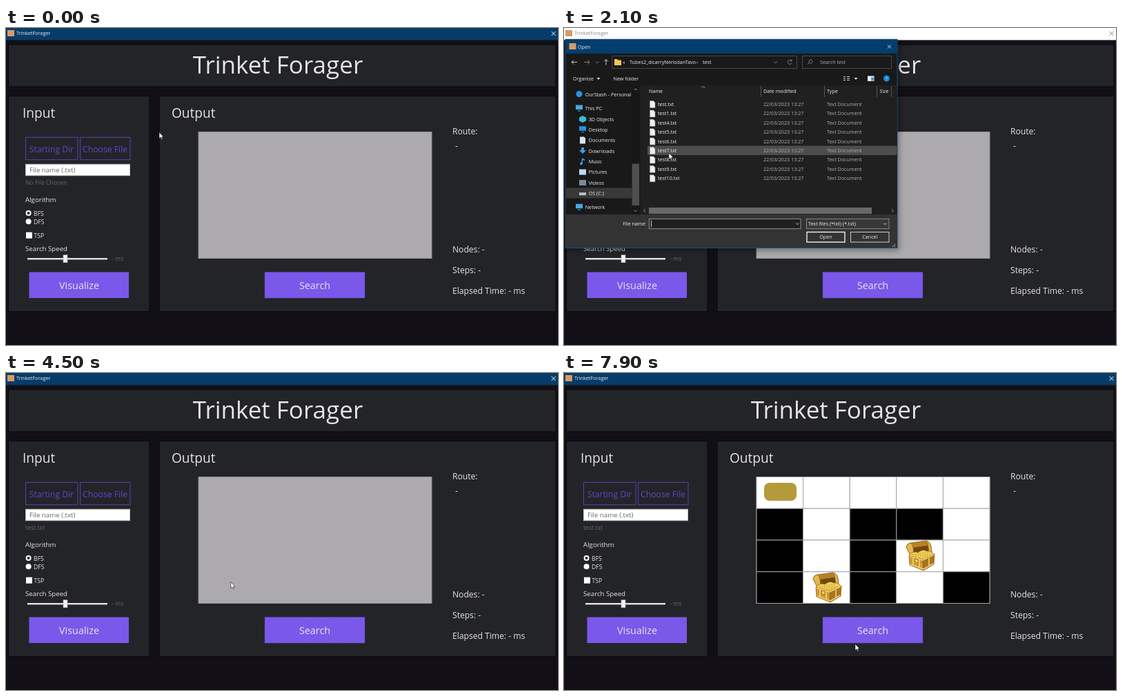
An HTML page for the animation above (8 s loop, 800x459 px).

```html
<!DOCTYPE html>
<html lang="en">
<head>
<meta charset="utf-8">
<title>TrinketForager</title>
<style>
  html, body { margin: 0; width: 100%; height: 100%; overflow: hidden; background: #121016; }
  svg { display: block; width: 800px; height: 459px; }
  text { font-family: "Open Sans", "Noto Sans", sans-serif; fill: #e6e4e8; white-space: pre; }
  .mid { text-anchor: middle; }
  .panel { fill: #232428; stroke: #08070a; }
  .h2 { font-size: 19.1px; }
  .btn { font-size: 14.4px; }
  .alt { font-size: 12.2px; fill: #6446cc; }
  .out { font-size: 12.1px; }
  .lab { font-size: 9.7px; }
  .sm { font-size: 8.7px; }
  .dim { fill: #66666a; }
  .line { fill: none; stroke: #ccc; stroke-width: 1; }
  .box { fill: none; stroke: #555; stroke-width: .8; }
  #dialog text { font-size: 7.2px; fill: #eee; }
  #dialog .grey { fill: #b0b0b0; }
  #dialog { filter: drop-shadow(2px 3px 4px rgba(0, 0, 0, .35)); }
  #blank, #dialog { transform-origin: 241px 167px; }
</style>
</head>
<body>
<svg viewBox="0 0 800 459">
  <defs>
    <g id="chest" stroke="#85571a" stroke-width=".7" stroke-linejoin="round">
      <path fill="#b98225" d="M1 9Q2 4 7 3L29 0Q36 1 37 9L38 17L7 21Z"/>
      <path fill="#e3b850" d="M1 9Q2 4 7 3Q11 5 11 11L12 20L7 21ZM29 0Q36 1 37 9L38 17L34 18L33 9Q33 3 29 0Z"/>
      <path fill="#6f4717" d="M12 10L32 7L34 18L12 20Z"/>
      <path fill="#f2cf55" d="M5 21Q11 14 18 17Q25 11 31 15Q38 14 41 20L25 28Z"/>
      <path fill="#d19a32" d="M5 21L25 27L26 43L6 35Z"/>
      <path fill="#ab7320" d="M25 27L42 19L41 34L26 43Z"/>
      <path fill="none" stroke="#f0cf6c" stroke-width="1.7" d="M6 22L25 28L41 20M7 34L26 41L40 33M11 24V36M20 27V39M34 25V36"/>
      <path fill="none" stroke="#b3862a" stroke-width="1" stroke-dasharray="1.5 2" d="M10 20L34 17M14 22L36 20M20 25L32 22"/>
      <path fill="#f6dc82" d="M14 26L18 27V32L14 31Z"/>
    </g>
    <path id="page" d="M0 0H5L7.5 2.5V10H0Z" fill="#eee" stroke="#999" stroke-width=".5"/>
  </defs>

  <rect width="800" height="459" fill="#121016"/>
  <rect id="bar" width="800" height="17.5"/>
  <rect x="2" y="3" width="10" height="9" fill="#d99a63"/>
  <text id="app" x="15" y="10.4" font-size="7.3">TrinketForager</text>
  <path id="close" d="M790.5 5l6 6m0-6l-6 6" fill="none"/>

  <rect class="panel" x="3.5" y="24" width="793.5" height="61"/>
  <rect class="panel" x="3.5" y="98.5" width="204.5" height="312"/>
  <rect class="panel" x="222" y="98.5" width="575" height="312"/>
  <text class="mid" x="394" y="66" font-size="35">Trinket Forager</text>
  <text class="h2" x="24" y="130">Input</text>
  <text class="h2" x="240" y="130">Output</text>

  <rect x="28.5" y="158.3" width="75.5" height="32.4" fill="none" stroke="#5a40b8"/>
  <text class="alt mid" x="66" y="179.7">Starting Dir</text>
  <rect id="choose" x="107.7" y="158.3" width="72.3" height="32.4" stroke="#5a40b8"/>
  <text class="alt mid" x="143.6" y="179.7">Choose File</text>
  <rect x="28.5" y="197.3" width="151" height="16.4" fill="#fff" stroke="#b5c4bb"/>
  <text class="lab" x="34" y="209" style="fill:#666">File name (.txt)</text>
  <text id="chosen" class="sm dim" x="28" y="227"></text>
  <text class="lab" x="28" y="252.3">Algorithm</text>
  <circle cx="32.6" cy="268" r="4" fill="#fff"/><circle cx="32.6" cy="268" r="2" fill="#222"/>
  <circle cx="32.6" cy="280.2" r="4" fill="#fff"/>
  <text class="sm" x="40" y="271.7">BFS</text>
  <text class="sm" x="40" y="284">DFS</text>
  <rect x="29" y="295.7" width="9" height="9" fill="#fff"/>
  <text class="sm" x="40.5" y="303.7">TSP</text>
  <text class="lab" x="28" y="322.6">Search Speed</text>
  <rect x="31" y="333" width="116" height="2.4" fill="#e2e2e4"/>
  <rect x="83" y="328.7" width="6" height="11" fill="#f2f2f2" stroke="#aaa" stroke-width=".6"/>
  <text class="sm dim" x="153" y="337.2">- ms</text>
  <rect id="visual" x="33.5" y="353.5" width="144.5" height="37.5"/>
  <text class="btn mid" x="106" y="378">Visualize</text>

  <rect x="279" y="150.5" width="338" height="183" fill="#acaaac" stroke="#8e8d90"/>
  <g id="map"></g>
  <rect x="375" y="353.5" width="145" height="37.5" fill="#7a58ea" stroke="#5a40b8" stroke-dasharray="1.5 1.5"/>
  <text class="btn mid" x="447.5" y="378">Search</text>
  <text class="out" x="647" y="154">Route:</text>
  <text class="out" x="651" y="174.5">-</text>
  <text class="out" x="647" y="324.6">Nodes: -</text>
  <text class="out" x="647" y="354.7">Steps: -</text>
  <text class="out" x="647" y="385">Elapsed Time: - ms</text>

  <g id="blank">
    <rect x="8" y="21" width="465" height="292" fill="#333"/>
    <rect x="8" y="21" width="465" height="19" fill="#0a2f4d"/>
    <rect x="13" y="26" width="9" height="8" fill="#d99a63"/>
    <text x="25" y="33" font-size="7">Open</text>
    <path class="line" d="M460 27l5 5m0-5l-5 5"/>
    <rect x="8" y="40" width="465" height="225" fill="#fff"/>
    <rect x="8" y="85" width="104" height="180" fill="#191919"/>
    <rect x="101" y="85" width="11" height="180" fill="#111"/>
    <rect x="124" y="255" width="338" height="10" fill="#222"/>
    <rect x="124" y="255" width="313" height="10" fill="#4d4d4d"/>
    <path fill="#fff" d="M124 271.500h215v14.500h-215ZM346 271.500h117v14.500h-117ZM346 289h54.500v16h-54.500ZM408 289h55v16h-55ZM463 302h10v11h-10Z"/>
    <rect x="88" y="273.500" width="33.500" height="9.500" fill="#ccc"/>
  </g>

  <g id="dialog">
    <rect x="2" y="16.500" width="481" height="302" fill="#191919" stroke="#17527f"/>
    <rect x="2.500" y="17" width="480" height="20" fill="#033e6e"/>
    <rect x="7.500" y="22" width="10" height="9" fill="#d99a63"/>
    <text x="20" y="29.600">Open</text>
    <path class="line" d="M469 24.500l5 5m0-5l-5 5"/>
    <path class="line" d="M19 49.500h-8m3-3l-3 3l3 3M61 53.500v-8m-3 3l3-3l3 3"/>
    <path class="line" style="stroke:#888" d="M29 49.500h8m-3-3l3 3l-3 3M46 48.500l2.300 2.300l2.300-2.300M304 48.500l2.500 2.500l2.500-2.500M329.800 47.500a3 3 0 1 0 .4 3m-.2-5v2.300h-2.300"/>
    <rect class="box" x="70" y="40.500" width="267.500" height="18"/>
    <path fill="#f3c653" d="M73 45h4l1 1.500h5v7.500h-10Z"/>
    <text x="85" y="52">«</text>
    <text x="95" y="52">Tubes2_dicarryNerisdanTavo</text>
    <text x="192" y="52">›</text>
    <text x="201" y="52">test</text>
    <rect class="box" x="345.500" y="40.500" width="129" height="18"/>
    <path class="line" style="stroke:#888" d="M353 53l2.500-3a2.500 2.500 0 1 1 1 .8"/>
    <text class="grey" x="371" y="52">Search test</text>
    <text x="13" y="75.600">Organize</text>
    <text x="71.500" y="75.600">New folder</text>
    <path fill="#ddd" d="M47.500 72h5l-2.500 3ZM420.500 72h5l-2.500 3Z"/>
    <path class="line" d="M405 70.500h3m2 0h4M405 73h3m2 0h4M405 75.500h3m2 0h4"/>
    <rect x="440" y="69.500" width="9.500" height="7.500" fill="#eee"/><rect x="445" y="71.500" width="4" height="5" fill="#3c9be0"/>
    <circle cx="467.500" cy="73" r="4.600" fill="#1487dd"/>
    <text class="mid" x="467.500" y="75.700">?</text>

    <rect x="110.500" y="83" width="372" height="187" fill="#202020"/>
    <rect x="3" y="231.500" width="95.500" height="15" fill="#393939"/>
    <g id="side"></g>
    <rect x="98.500" y="83" width="10.500" height="187" fill="#171717"/>
    <rect x="98.500" y="196.500" width="10.500" height="60.500" fill="#4f4f4f"/>
    <path class="line" style="stroke:#999" d="M101.500 90l2.300-2.300l2.300 2.300M101.500 263.500l2.300 2.300l2.300-2.300M199.500 86.500l2.500-2l2.500 2M118 262.300l-2.300 2.200l2.300 2.200M475 262.300l2.300 2.200l-2.300 2.200"/>
    <path class="line" style="stroke:#555" d="M285.500 84v16M377.500 84v16M453.500 84v16M474.500 84v16"/>
    <text x="123" y="94">Name</text>
    <text x="289" y="94">Date modified</text>
    <text x="381" y="94">Type</text>
    <text x="457.500" y="94">Size</text>
    <rect id="picked" x="121.500" y="103.800" width="360.500" height="13" fill="#777" stroke="#999" stroke-width=".7"/>
    <rect id="hover" x="121" width="361.500" height="13.400" fill="#4d4d4d"/>
    <g id="files"></g>
    <rect x="123" y="260" width="323" height="9" fill="#686868"/>

    <rect x="2.500" y="270" width="480" height="48" fill="#333"/>
    <text x="119.500" y="285.800" text-anchor="end">File name:</text>
    <rect id="field" x="123.500" y="276.300" width="219.500" height="14.400" stroke="#aaa" stroke-width=".8"/>
    <text id="fname" x="125.500" y="286"></text>
    <path id="caret" class="line" d="M126.500 278.500v10"/>
    <rect x="351.500" y="276.300" width="119.500" height="14.400" fill="#383838" stroke="#999" stroke-width=".8"/>
    <text x="354" y="286">Text files (*txt) (*.txt)</text>
    <path class="line" d="M336 282.500l2.200 2.200l2.200-2.200M463 282.500l2.200 2.200l2.200-2.200"/>
    <rect x="352" y="295.500" width="55" height="14.500" fill="#333" stroke="#eee" stroke-width="1.400"/>
    <rect x="415.500" y="295.500" width="55.500" height="14.500" fill="#333" stroke="#ccc"/>
    <text class="mid" x="379.500" y="305.300">Open</text>
    <text class="mid" x="443.300" y="305.300">Cancel</text>
    <path d="M476 316h5m-2.500-2.500h2.500" stroke="#aaa" stroke-width="1.300" stroke-dasharray="1.300 1.200"/>
  </g>

  <path id="cursor" d="M0 0V9L2.100 7.200L3.500 10.300L4.900 9.700L3.600 6.700H6.400Z" fill="#fff" stroke="#111" stroke-width=".6"/>
</svg>
<script>
const $ = id => document.getElementById(id);
const LOOP = 8000, STEP = 100, ROW0 = 103.6, ROW = 13.4;

// Map: 1 = wall
const W = 67.6, H = 45.75;
$("map").innerHTML = ["00000", "10110", "10100", "10101"].map((row, r) => [...row].map((c, i) =>
  `<rect x="${279 + i * W}" y="${150.5 + r * H}" width="${W}" height="${H}" fill="${+c ? "#000" : "#fff"}" stroke="#a5a4a6"/>`
).join("")).join("") +
  `<rect x="290" y="159" width="47" height="26" rx="8" fill="#b59a3c"/>
   <use href="#chest" x="360" y="289"/><use href="#chest" x="495" y="243"/>`;

// Sidebar: name, centre y, indent, icon colour, icon path
const screen = "M0 0h10v6.500h-10ZM3 8h4v1h-4Z", sheet = "M1 0h6l2 2v8h-8Z";
const arrow = "M3 0h4v4h3l-5 5l-5-5h3Z", note = "M4 0l4 2v2l-3-1v5a2 2 0 1 1-1.500-2Z";
$("side").innerHTML = [
  ["OurStash - Personal", 96, 17, "#2a91e0", "M5 0a4.500 4.500 0 1 1-.1 0Z"],
  ["This PC", 116.5, 17, "#45a9e6", screen],
  ["3D Objects", 132, 22, "#42b6d6", "M5 0l5 2.500v5l-5 2.500l-5-2.500v-5Z"],
  ["Desktop", 147.3, 22, "#2a91e0", screen],
  ["Documents", 162.6, 22, "#d8e4ec", sheet],
  ["Downloads", 178, 22, "#3b9de8", arrow],
  ["Music", 193.3, 22, "#3b9de8", note],
  ["Pictures", 208.6, 22, "#b9dcec", "M0 1h10v8h-10Z"],
  ["Videos", 224, 22, "#7e8aa0", "M0 1h10v8h-10Z"],
  ["OS (C:)", 239.2, 22, "#b8c4cc", "M0 4h10v4h-10Z"],
  ["Network", 259.7, 17, "#45a9e6", screen],
].map(([name, y, x, fill, d]) =>
  `<path transform="translate(${x} ${y - 5})" fill="${fill}" d="${d}"/><text x="${x + 13.7}" y="${y + 2.6}">${name}</text>`
).join("");

const files = ["", 1, 4, 5, 6, 7, 8, 9, 10];
$("files").innerHTML = files.map((n, i) => {
  const y = 113 + i * ROW;
  return `<use href="#page" x="124.500" y="${y - 7.5}"/><text x="136" y="${y}">test${n}.txt</text>
    <text class="grey" x="289" y="${y}">22/03/2023 13:27</text><text class="grey" x="381" y="${y}">Text Document</text>`;
}).join("");

// Pointer stops: time, x, y
const stops = [
  [0, 222, 151], [600, 162, 177], [1000, 158, 182], [1500, 157, 217.5], [1700, 157, 217.5],
  [2100, 152, 181], [2700, 150, 109], [3100, 150, 109], [3900, 363, 301], [4300, 363, 301],
  [5200, 68, 313.5], [5500, 68, 316], [6100, 84, 371], [6300, 84, 371], [6500, 79, 374.5],
  [6900, 79, 374.5], [7300, 230, 424], [7700, 400, 410], [7900, 422, 392.5], [LOOP, 422, 392.5],
];

function pointer(t) {
  const i = stops.findIndex(s => s[0] > t);
  const [t0, x0, y0] = stops[i - 1], [t1, x1, y1] = stops[i];
  const u = (t - t0) / (t1 - t0), e = u * u * (3 - 2 * u);
  return [x0 + (x1 - x0) * e, y0 + (y1 - y0) * e];
}

const inside = (x, y, l, t, r, b) => x >= l && x <= r && y >= t && y <= b;
const show = (id, on) => $(id).setAttribute("display", on ? "inline" : "none");
const paint = (id, fill) => $(id).setAttribute("fill", fill);
function pose(id, opacity, scale) {
  $(id).style.opacity = opacity;
  $(id).style.transform = scale === 1 ? "none" : `scale(${scale})`;
}

function draw(t) {
  const [x, y] = pointer(t);
  const modal = t >= 900 && t < 4300, picked = t >= 2900, closing = t >= 4300;
  $("cursor").setAttribute("transform", `translate(${x} ${y})`);

  paint("bar", modal ? "#fff" : "#063c69");
  $("app").style.fill = modal ? "#888" : "#e6eef5";
  $("close").setAttribute("stroke", modal ? "#888" : "#fff");
  paint("choose", modal || inside(x, y, 108, 158, 180, 191) ? "#bee6fd" : "#232428");
  const over = inside(x, y, 33, 353, 178, 391);
  paint("visual", !over ? "#7a58ea" : t >= 6400 ? "#c4e5f6" : "#bee6fd");
  $("chosen").textContent = closing ? "test.txt" : "No File Chosen";
  show("map", t >= 6900);

  show("blank", t >= 1600 && t < 1900);
  pose("blank", t < 1700 ? .12 : t < 1800 ? .42 : .9, t < 1700 ? .95 : t < 1800 ? 1 : 1.03);

  show("dialog", t >= 1900 && t < 4400);
  pose("dialog", closing ? .42 : 1, closing ? .965 : 1);
  const row = Math.floor((y - ROW0) / ROW);
  show("hover", x > 121 && x < 482 && row >= (picked ? 1 : 0) && row < files.length);
  $("hover").setAttribute("y", ROW0 + row * ROW);
  show("picked", picked);
  $("fname").textContent = picked ? "test.txt" : "";
  paint("field", picked ? "#383838" : "#202020");
  show("caret", !picked && t % 1000 < 600);
}

function frame(now) {
  draw(Math.floor(now % LOOP / STEP) * STEP);
  requestAnimationFrame(frame);
}
draw(0);
requestAnimationFrame(frame);
</script>
</body>
</html>
```
